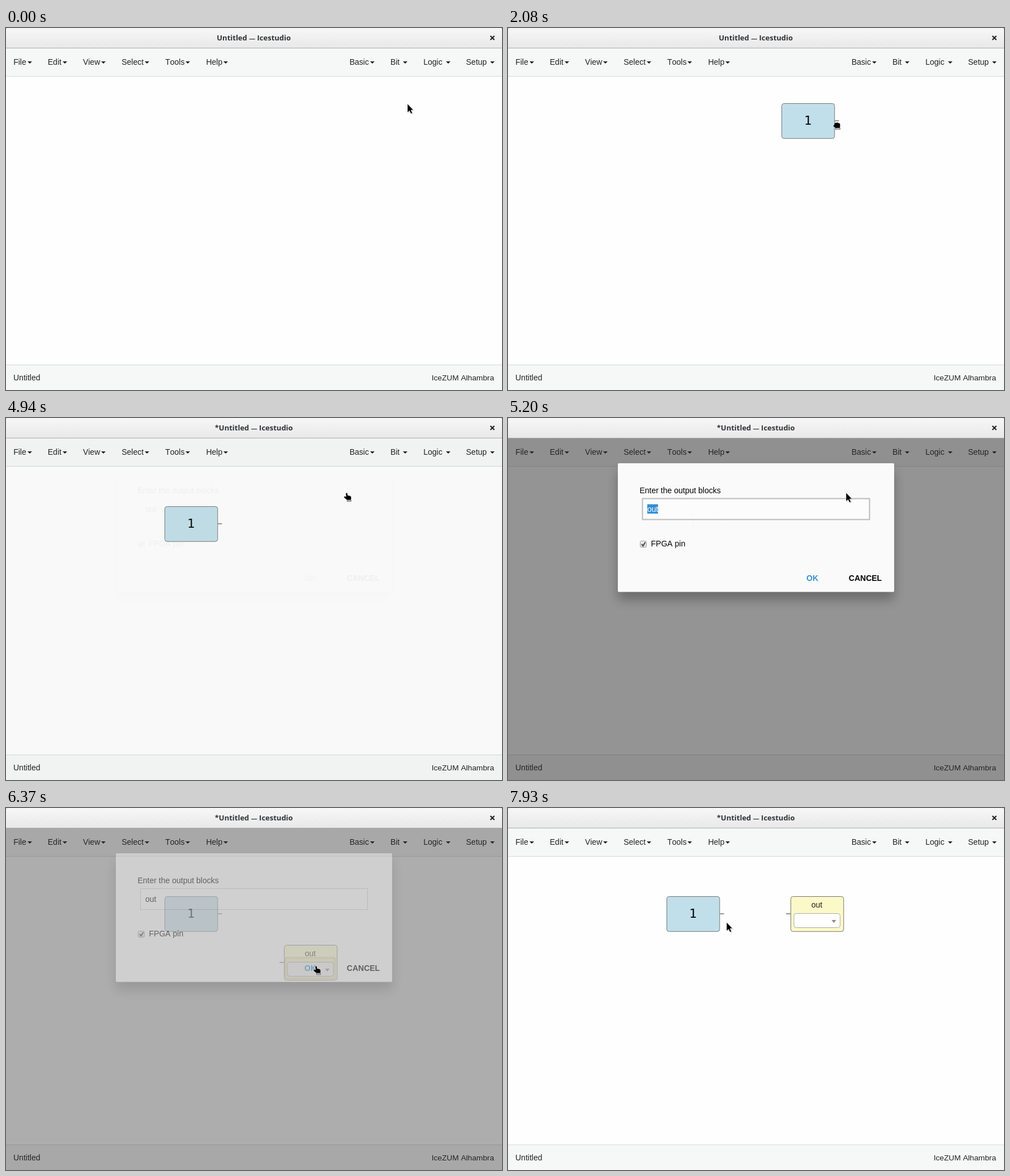
An HTML page that plays this animation: 876x640 px, repeating every 8 s.

```html
<!DOCTYPE html>
<html lang="en">
<head>
<meta charset="utf-8">
<title>Block editor</title>
<style>
  html, body { margin: 0; width: 100%; height: 100%; overflow: hidden; background: #fefefe; }
  svg { display: block; width: 876px; height: 640px; }
  text, nav { font: 14px "Liberation Sans", Arial, sans-serif; font-kerning: none; white-space: pre; }
  text { fill: #222; }
  .title { font: 700 13px "Open Sans", "Noto Sans", sans-serif; fill: #2e3436; text-anchor: middle; }
  .dash { font-size: 11px; }
  .bold { font-weight: 700; text-anchor: middle; fill: #000; }
  .mid { text-anchor: middle; }
  .digit { font: 22px "DejaVu Sans Mono", monospace; text-anchor: middle; fill: #000; }
  .board { font-size: 13.7px; text-anchor: end; }
  .edge { stroke: #757575; }
  .panel { filter: drop-shadow(0 14px 10px rgba(0,0,0,.28)); }
  #dialog text { fill: #000; }
  #dialog .ok { fill: #3593d2; }

  foreignObject { overflow: visible; }
  nav { position: absolute; display: flex; color: #222; line-height: 48px; }
  .tab { position: relative; height: 49px; padding: 0 14px; }
  .tab.open { background: #e7e7e7; }
  .caret { display: inline-block; margin-left: 2px; vertical-align: middle; border: 4px solid transparent; border-top-color: #222; border-bottom: 0; }
  .menu { position: absolute; right: 0; top: 48px; width: 156px; box-sizing: border-box; padding: 5px 0;
    border: 1px solid rgba(0,0,0,.15); border-radius: 0 0 4px 4px; background: #fff padding-box;
    box-shadow: 0 6px 12px rgba(0,0,0,.175); line-height: 25.6px; visibility: hidden; }
  .open .menu { visibility: visible; }
  .row { padding-left: 20px; }
  .row.over { background: #f5f5f5; }
</style>
</head>
<body>
<svg viewBox="0 0 876 640">
  <defs>
    <linearGradient id="bar" x2="0" y2="1">
      <stop stop-color="#f7f7f7"/><stop offset="1" stop-color="#e8e8e8"/>
    </linearGradient>
    <linearGradient id="tick" x2="0" y2="1">
      <stop stop-color="#f3f3f3"/><stop offset="1" stop-color="#d8d8d8"/>
    </linearGradient>
  </defs>

  <rect width="876" height="640" fill="#fefefe"/>
  <rect y="36" width="876" height="49" fill="#f6f7f7"/>
  <rect y="85" width="876" height="1" fill="#d6d9d8"/>
  <rect y="596" width="876" height="44" fill="#f6f7f7"/>
  <rect y="595" width="876" height="1" fill="#d6d9d8"/>
  <text x="13" y="623">Untitled</text>
  <text class="board" x="862" y="623">IceZUM Alhambra</text>

  <g id="constant">
    <path class="edge" d="M94 31H101.500" stroke-width="1.500"/>
    <rect class="edge" x=".5" y=".5" width="93.300" height="61.800" rx="4" fill="#c1dfea"/>
    <text class="digit" x="46.500" y="38">1</text>
  </g>
  <g id="output">
    <path class="edge" d="M-8 31H0" stroke-width="1.500"/>
    <rect class="edge" x=".5" y=".5" width="93.300" height="61.800" rx="4" fill="#fcf9c9"/>
    <text class="mid" x="46.500" y="20">out</text>
    <rect x="6" y="30.500" width="81.500" height="25" rx="4" fill="#fff" stroke="#aaa"/>
    <path d="M72.500 42h8l-4 5z" fill="#888"/>
  </g>

  <foreignObject y="36" width="876" height="49">
    <nav id="left" style="left:-.8px"></nav>
    <nav id="right" style="right:-1px"></nav>
  </foreignObject>

  <rect id="dim" y="36" width="876" height="604" fill="#252525"/>
  <g id="dialog">
    <rect class="panel" x="194" y="80" width="488" height="227.500" rx="2" fill="#fdfdfd"/>
    <text x="232.500" y="133">Enter the output blocks</text>
    <rect id="field" x="237.500" y="142.500" width="401" height="37" fill="#fff"/>
    <rect id="mark" x="246" y="152.500" width="19" height="16.500" fill="#318fd4"/>
    <text id="value" x="246" y="166">out</text>
    <rect x="233.500" y="217.500" width="11" height="11" rx="2" fill="url(#tick)" stroke="#a0a0a0"/>
    <path d="M236 223l2.500 3 4-6.500" fill="none" stroke="#444" stroke-width="2"/>
    <text x="252.500" y="227">FPGA pin</text>
    <rect id="hover" x="493.500" y="264.500" width="88" height="37" rx="2" fill-opacity=".05" stroke="#000" stroke-opacity=".12" stroke-width="2"/>
    <text class="bold ok" x="537.500" y="288">OK</text>
    <text class="bold" x="631" y="288">CANCEL</text>
  </g>

  <path d="M0 0H876V36H0z" fill="#cfcfcf"/>
  <path d="M0 36V4Q0 0 4 0H872Q876 0 876 4V36z" fill="url(#bar)"/>
  <rect y="35" width="876" height="1" fill="#a9adab"/>
  <text class="title" x="437.700" y="22"><tspan id="star">*</tspan>Untitled <tspan class="dash">—</tspan> Icestudio</text>
  <path d="M855.500 14l7 7m0-7l-7 7" stroke="#222" stroke-width="2.200"/>

  <g id="cursor" stroke="#fff" stroke-width=".6" stroke-linejoin="round">
    <g id="arrow">
      <path d="M1.500 2V17l3.500-3 2.600 5 2.600-1.200-2.300-5h4.600z" opacity=".18"/>
      <path d="M0 0V15.500L3.600 12.200 6 17.500 8.600 16.300 6.200 11H10.500z"/>
    </g>
    <g id="hand">
      <path d="M3 2Q3 .2 4.600 .2T6.400 2V4.600L10.500 5.400Q12.800 6 12.800 8V11.500L12 13H5L.3 9Q-1 7 .6 6.300L3.500 7z"/>
      <path d="M5.500 13.500h7v2h-7z" fill="#eee" stroke="#111"/>
    </g>
    <g id="fist" transform="translate(0 4)">
      <path d="M2 4Q4 1.500 6 2.200 8 1 9.500 2.800 12 2.500 12.800 5V10L12 12H4.500L.5 9Q-.5 6.800 2 6.500z"/>
      <path d="M4.500 12h8v2.300h-8z" fill="#eee" stroke="#111"/>
    </g>
  </g>
</svg>
<script>
const LOOP = 8000, STEP = 130;
const $ = id => document.getElementById(id);
const show = (el, on) => el.setAttribute('visibility', on ? 'visible' : 'hidden');
const place = (el, x, y) => el.setAttribute('transform', `translate(${Math.round(x)} ${Math.round(y)})`);
const clamp = (v, lo, hi) => Math.min(Math.max(v, lo), hi);
const ramp = (t, from, to) => clamp((t - from) / (to - from), 0, 1);
const ease = p => p * p * (3 - 2 * p);

const lists = {
  Basic: ['Input', 'Output', 'Constant', 'Code', 'Information'],
  'Bit ': ['0', '1']
};
const tab = name => `<div class="tab">${name}<i class="caret"></i>${lists[name]
  ? `<div class="menu">${lists[name].map(s => `<div class="row">${s}</div>`).join('')}</div>` : ''}</div>`;
$('left').innerHTML = ['File', 'Edit', 'View', 'Select', 'Tools', 'Help'].map(tab).join('');
$('right').innerHTML = ['Basic', 'Bit ', 'Logic ', 'Setup '].map(tab).join('');
const [basic, bit] = $('right').children;

// Pointer moves: start, end, destination, shape from the start on
const moves = [
  [0, 910, 693, 74, 'arrow'],          // to Bit
  [910, 1560, 646, 121, 'hand'],       // item 1
  [1690, 2080, 574, 160.5, 'fist'],    // carry the constant
  [2080, 2575, 329, 188, 'fist'],
  [2600, 3510, 566, 84, 'arrow'],
  [3510, 3900, 616, 64, 'hand'],       // to Basic
  [3900, 4420, 597, 132, 'hand'],      // item Output
  [5070, 5460, 597, 132, 'arrow'],     // dialog opens
  [5460, 6110, 546, 262, 'arrow'],
  [6110, 6370, 543, 279, 'hand'],      // OK
  [6760, 7280, 551, 193, 'fist'],      // drag the output
  [7410, 7540, 551, 193, 'arrow'],
  [7540, 7930, 386, 202, 'arrow']
];

function pointer(t) {
  let x = 709, y = 134, shape = 'arrow';
  for (const [from, to, toX, toY, kind] of moves) {
    if (t < from) break;
    const p = ease(ramp(t, from, to));
    x += (toX - x) * p;
    y += (toY - y) * p;
    shape = kind;
  }
  return { x, y, shape };
}

// A carried block runs one step ahead of the pointer
function carry(el, t, from, to, dx, dy) {
  const p = pointer(clamp(t + STEP, from, to));
  place(el, p.x - dx, p.y - dy);
}

function setMenu(el, open, y) {
  el.classList.toggle('open', open);
  el.querySelectorAll('.row').forEach((row, i) =>
    row.classList.toggle('over', Math.floor((y - 90) / 25.6) === i));
}

function draw(t) {
  const { x, y, shape } = pointer(t);
  place($('cursor'), x, y);
  for (const id of ['arrow', 'hand', 'fist']) show($(id), id === shape);

  setMenu(bit, t >= 650 && t < 1820, y);
  setMenu(basic, t >= 3900 && t < 4550, y);

  show($('constant'), t >= 1950);
  carry($('constant'), t, 1950, 2600, 49, 32);
  show($('output'), t >= 6370);
  carry($('output'), t, 6630, 7280, 52, 37);
  $('star').textContent = t >= 2730 ? '*' : '';

  const opening = ramp(t, 4930, 5205);
  $('dialog').setAttribute('opacity', opening * (1 - ramp(t, 6290, 6430)));
  $('dim').setAttribute('opacity', .5 * opening * (1 - ramp(t, 6320, 6520)));

  const focus = t >= 5070 && t < 6370;
  $('field').setAttribute('stroke', focus ? '#bcbcbc' : '#ccc');
  $('field').setAttribute('stroke-width', focus ? 2 : 1);
  show($('mark'), focus);
  $('value').style.fill = focus ? '#fff' : '#000';
  show($('hover'), t >= 6110);
}

const start = performance.now();
function tick() {
  const t = (performance.now() - start) % LOOP;
  draw(Math.floor(t / STEP) * STEP);
  requestAnimationFrame(tick);
}
tick();
</script>
</body>
</html>
```
